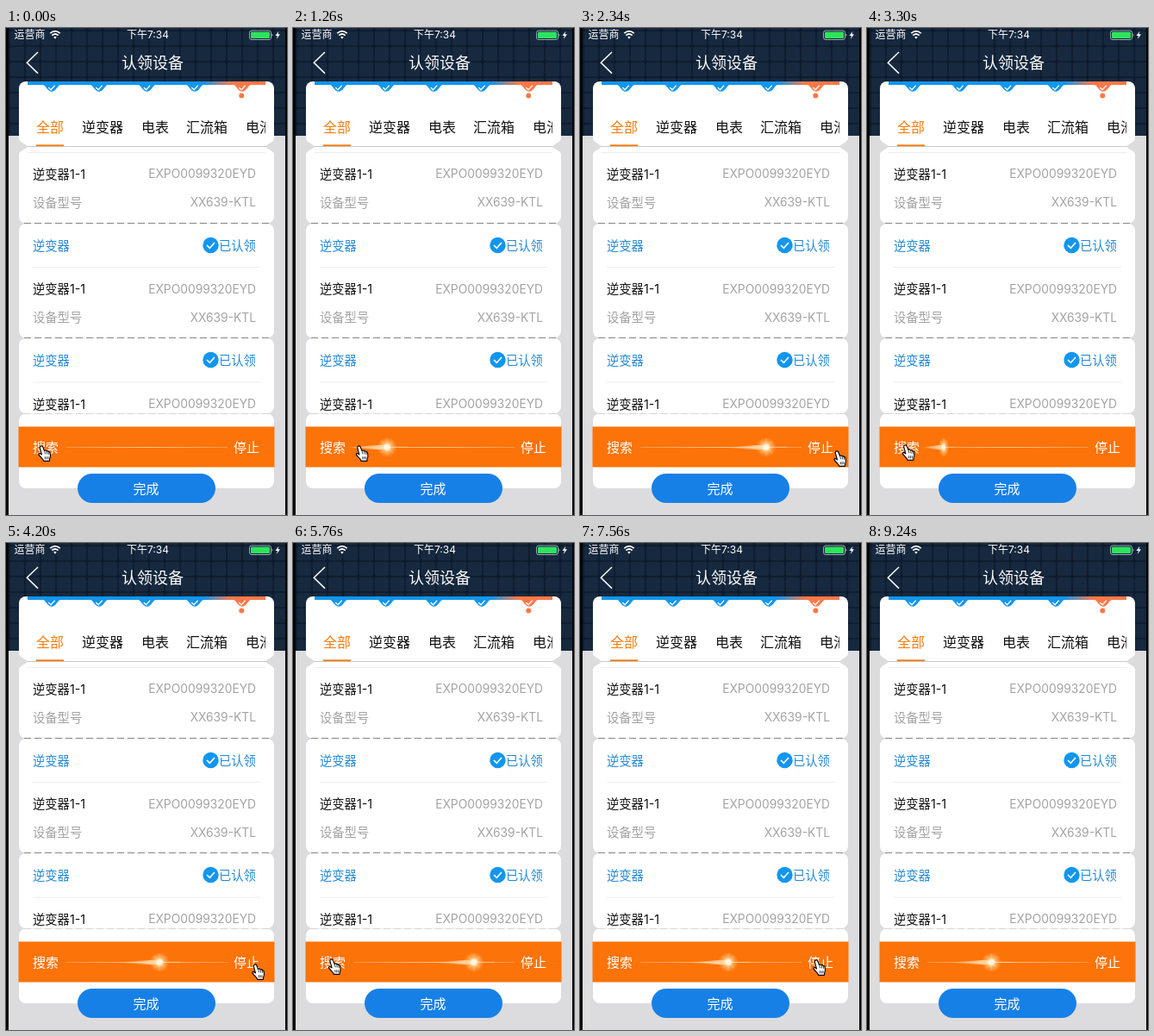
Write an HTML page that moves like this. It is 326 px wide and 565 px high and loops after 9.3 s.

```html
<!DOCTYPE html>
<html lang="zh-CN">
<head>
<meta charset="utf-8">
<style>
html, body { margin: 0; width: 100%; height: 100%; overflow: hidden; background: #dcdcde; }
svg { display: block; width: 326px; height: 565px; }
text { font-family: Inter, "Noto Sans CJK SC", "Noto Sans CJK", sans-serif; }
</style>
</head>
<body>
<svg viewBox="0 0 326 565">
  <defs>
    <pattern id="grid" width="18" height="18" x="4" y="3" patternUnits="userSpaceOnUse">
      <rect x=".8" y=".8" width="16.4" height="16.4" rx="2" fill="#16293f"/>
    </pattern>
    <linearGradient id="steps" gradientUnits="userSpaceOnUse" x1="219" x2="262">
      <stop offset=".25" stop-color="#1296ee"/><stop offset="1" stop-color="#ff7847"/>
    </linearGradient>
    <linearGradient id="track" gradientUnits="userSpaceOnUse" x1="70" x2="257">
      <stop stop-color="#ffe9c4" stop-opacity=".3"/><stop offset=".5" stop-color="#ffe9c4" stop-opacity=".7"/>
      <stop offset="1" stop-color="#ffe9c4" stop-opacity=".3"/>
    </linearGradient>
    <linearGradient id="tail">
      <stop stop-color="#ffe5bd" stop-opacity="0"/><stop offset="1" stop-color="#fff2d8" stop-opacity=".9"/>
    </linearGradient>
    <radialGradient id="halo">
      <stop stop-color="#fff"/><stop offset=".25" stop-color="#fff5df"/>
      <stop offset=".4" stop-color="#ffdca0" stop-opacity=".7"/>
      <stop offset=".75" stop-color="#ffc477" stop-opacity=".3"/>
      <stop offset="1" stop-color="#ffb35c" stop-opacity="0"/>
    </radialGradient>
    <clipPath id="tabs"><rect x="25" y="95" width="276" height="44"/></clipPath>
    <clipPath id="list"><rect x="15" y="360" width="296" height="87"/></clipPath>
  </defs>

  <rect width="326" height="565" fill="#dcdcde"/>
  <rect width="326" height="125" fill="#0d1a2c"/>
  <rect width="326" height="125" fill="url(#grid)"/>
  <path d="M0 0H3V565H0ZM324 0H326V565H324Z" fill="#050505"/>

  <g fill="none" stroke="#fff">
    <path d="M37 28L24.3 40.3L37 52.6" stroke-width="1.5"/>
    <path d="M51.3 6.2Q57 1.2 62.7 6.2M53.3 8.6Q57 5.4 60.7 8.6" stroke-width="1.7"/>
    <rect x="282.5" y="3" width="25" height="10.5" rx="2.5" stroke="#aeb5c0" stroke-width=".9"/>
  </g>
  <path d="M55.2 10.5Q57 9 58.8 10.5L57 12.7Z" fill="#fff"/>
  <rect x="284" y="4.5" width="22" height="7.5" rx="1.3" fill="#2ee35c"/>
  <path d="M308.5 6.5q2 1.7 0 3.5z" fill="#aeb5c0"/>
  <path d="M316.5 3.5L312.5 9H315L313.8 13L318 7.3H315.4Z" fill="#fff"/>

  <g fill="#fff">
    <rect x="15" y="62" width="296" height="164.5" rx="8"/>
    <rect x="15" y="227" width="296" height="132.5" rx="8"/>
    <rect x="15" y="360" width="296" height="87" rx="8"/>
    <rect x="15" y="447.5" width="296" height="86.5" rx="8"/>
  </g>
  <g fill="#dcdcde">
    <path id="notch" d="M14.5 127Q15.5 131.5 19 133Q24.5 136 24.5 137.5Q24.5 139 19 142Q15.5 143.5 14.5 148Z"/>
    <use href="#notch" transform="translate(326 0) scale(-1 1)"/>
  </g>
  <rect x="25" y="62" width="276" height="4" fill="url(#steps)"/>
  <g id="marks"></g>
  <circle cx="273.3" cy="78.5" r="3" fill="#ff7847"/>

  <path d="M24 137.5H302" stroke="#c9c9cb"/>
  <path d="M25 144.5H301" stroke="#ececee"/>
  <path d="M35 136.2H67" stroke="#f57c0b" stroke-width="1.8"/>
  <path d="M31 277.5H295M31 411H295" stroke="#ececee"/>
  <path d="M21 226.5H306M21 359.5H306" stroke="#858587" stroke-dasharray="8 4"/>
  <path d="M21 447.5H306" stroke="#d5d5d7" stroke-dasharray="8 4"/>
  <g id="labels"></g>

  <rect x="14.5" y="462.5" width="297" height="47" fill="#fb7309"/>
  <rect x="70" y="486" width="187" height="1" fill="url(#track)"/>
  <path id="spark-start" d="M71 481V492" stroke="#ffd9ab" stroke-width="1"/>
  <g id="spark">
    <path d="M-50 .4L-8 -2.6L0 -2L0 2.4L-8 3Z" fill="url(#tail)"/>
    <circle r="12" fill="url(#halo)"/>
    <path d="M0 -10V10M-7 -7L7 7M-7 7L7 -7" stroke="#ffe3b8" stroke-width=".7" opacity=".45"/>
    <path d="M0 0H24" stroke="#fff0d5" stroke-width="1" opacity=".4"/>
  </g>
  <rect x="83" y="517" width="160" height="34" rx="17" fill="#1780e7"/>
  <g id="actions"></g>

  <g id="cursor">
    <g transform="translate(-.7 1.3) scale(.94 1)">
      <path d="M-4.5 -8Q-2.7 -9.2 -1.6 -7.2L.2 -2.8Q1.7 -4 2.9 -2.4Q4.4 -3.3 5.3 -1.5Q7 -2 7.4 .2Q8.2 4 6.8 6.5L6.5 9H-.8L-1.5 7.3L-6.4 2.2Q-7.5 .4 -5.6 0Q-4.3 .1 -3 1.6L-5.3 -6.2Q-5.5 -7.3 -4.5 -8Z"
        fill="#fff" stroke="#000" stroke-width="1.2" stroke-linejoin="round"/>
      <path d="M.5 -2L1.4 1M3.1 -1.8L3.7 1.2M5.4 -1L5.8 1.5M1 4V7M3 4V7M5 4V7" stroke="#000" stroke-width=".8"/>
    </g>
  </g>
</svg>

<script>
const LOOP = 9300;
const byId = id => document.getElementById(id);

function add(parent, name, attributes, content = "") {
  const node = document.createElementNS("http://www.w3.org/2000/svg", name);
  for (const key in attributes) node.setAttribute(key, attributes[key]);
  node.textContent = content;
  parent.append(node);
  return node;
}

function label(content, x, y, size, fill = "#fff", { parent = byId("labels"), anchor = "start", weight = 400 } = {}) {
  return add(parent, "text",
    { x, y, "font-size": size, fill, "text-anchor": anchor, "font-weight": weight }, content);
}

function check(x, y, size, parent) {
  add(parent, "path", {
    d: `M${x - size} ${y}l${size * .75} ${size * .75}l${size * 1.25} ${-size * 1.4}`,
    fill: "none", stroke: "#fff", "stroke-width": size * .36
  });
}

// Progress bumps
[53, 108, 163.5, 219, 274].forEach((x, i) => {
  add(byId("marks"), "path", {
    d: `M${x - 11} 65.5Q${x - 8} 66 ${x - 6.5} 69Q${x} 78.5 ${x + 6.5} 69Q${x + 8} 66 ${x + 11} 65.5Z`,
    fill: i < 4 ? "#1296ee" : "#ff7847"
  });
  check(x, 69, 3.7, byId("marks"));
});

label("运营商", 9.5, 12.3, 12);
label("下午7:34", 164.5, 12.3, 12, "#fff", { anchor: "middle" });
label("认领设备", 134, 47, 18, "#fff", { weight: 500 });

const tabs = add(byId("labels"), "g", { "clip-path": "url(#tabs)" });
[["全部", 35], ["逆变器", 88], ["电表", 157], ["汇流箱", 209], ["电池", 278]].forEach(([name, x], i) =>
  label(name, x, 121, 16, i ? "#111" : "#f57c0b", { parent: tabs }));

function device(y, parent) {
  label("逆变器1-1", 31, y, 14.3, "#111", { parent });
  label("EXPO0099320EYD", 290, y - .5, 13.8, "#a3a3a5", { parent, anchor: "end" });
  label("设备型号", 31, y + 33.3, 14.3, "#a3a3a5", { parent });
  label("XX639-KTL", 290, y + 32.5, 13.8, "#a3a3a5", { parent, anchor: "end" });
}
device(174.5);
device(308);
device(441.5, add(byId("labels"), "g", { "clip-path": "url(#list)" }));

[252, 385].forEach(y => {
  label("逆变器", 31, y + 5.5, 14.3, "#2389d6");
  label("已认领", 247, y + 5.5, 14.3, "#2389d6");
  add(byId("labels"), "circle", { cx: 237.5, cy: y, r: 9.2, fill: "#1296ee" });
  check(237.5, y, 4.5, byId("labels"));
});

const actions = { parent: byId("actions") };
label("搜索", 31, 492, 15, "#fff", actions);
label("停止", 264, 492, 15, "#fff", actions);
label("完成", 147.5, 540, 15, "#fff", actions);

// The spark advances only between a click on search and a click on stop.
const runs = [[866, 2450], [2733, 4523], [5984, LOOP]];
const SWEEP = 1960, TRACK_START = 70, TRACK_LENGTH = 194;

const pointer = [
  [0, 45, 492], [860, 45, 492], [1260, 80, 492], [1800, 316, 500], [2340, 302, 498],
  [2450, 300, 497], [2733, 60, 491], [3300, 48, 491], [3900, 293, 496], [4523, 293, 496],
  [5250, 50, 490], [5984, 48, 490], [6420, 278, 491], [8150, 278, 491],
  [8640, 285, 534], [8850, 289, 580], [LOOP, 289, 580]
];

function pointerAt(time) {
  const i = pointer.findIndex(key => key[0] > time);
  const [t0, x0, y0] = pointer[i - 1], [t1, x1, y1] = pointer[i];
  const k = (time - t0) / (t1 - t0);
  return [x0 + (x1 - x0) * k, y0 + (y1 - y0) * k];
}

function draw() {
  const time = performance.now() % LOOP;
  const active = runs.reduce((sum, [from, to]) => sum + Math.max(0, Math.min(time, to) - from), 0);
  const travel = active % SWEEP / SWEEP * TRACK_LENGTH;
  const stretch = Math.min(1, travel / 36);
  byId("spark").setAttribute("transform",
    `translate(${TRACK_START + travel} 486.3) scale(${Math.max(stretch, .01)} 1)`);
  byId("spark").setAttribute("visibility", travel > 2 ? "visible" : "hidden");
  byId("spark-start").setAttribute("visibility", travel > 0 && travel <= 2 ? "visible" : "hidden");
  byId("cursor").setAttribute("transform", `translate(${pointerAt(time)})`);
  requestAnimationFrame(draw);
}
draw();
</script>
</body>
</html>
```
